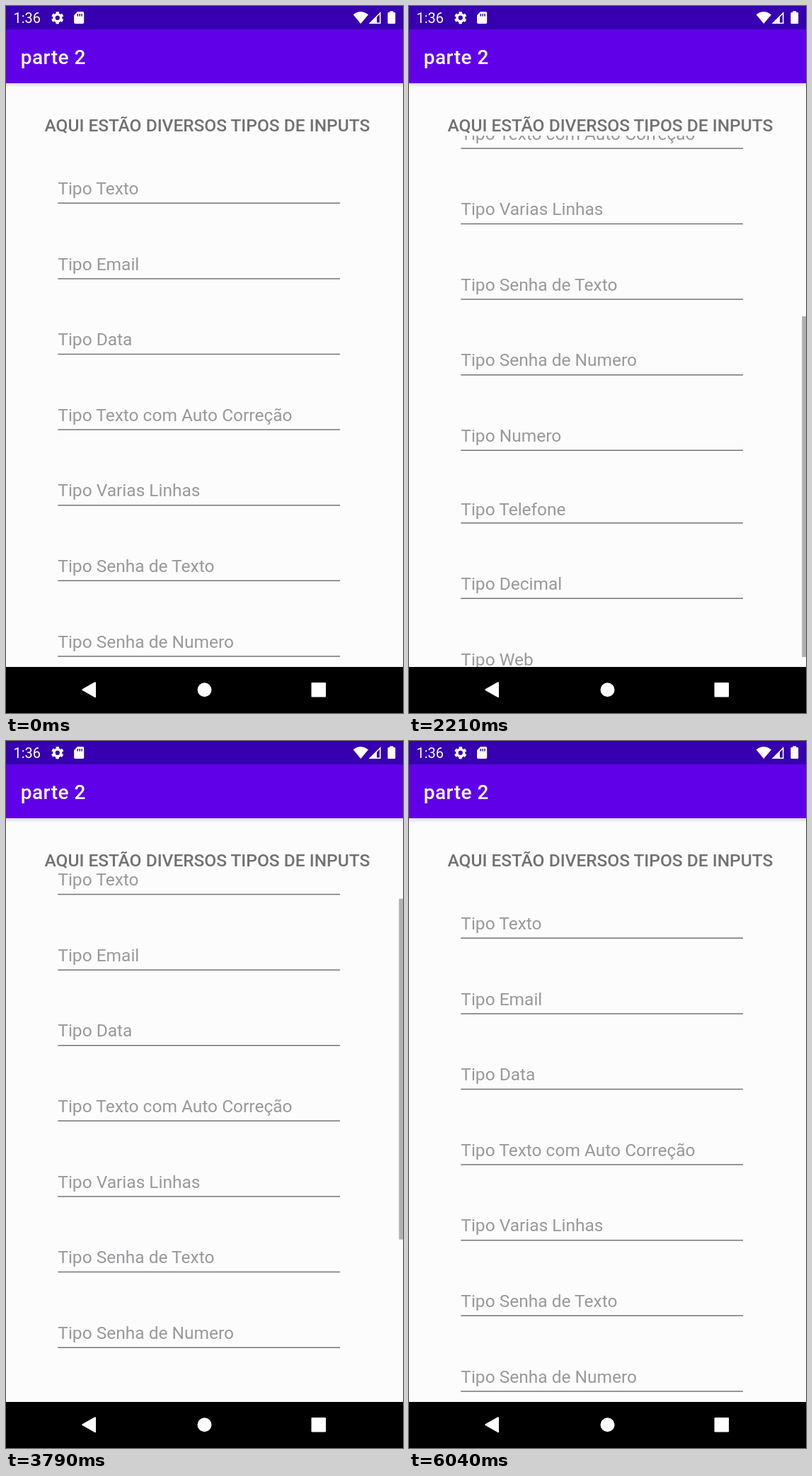
Write an HTML page that moves like this. It is 561 by 998 pixels and loops after 6.08 s.

```html
<!DOCTYPE html>
<html lang="pt">
<head>
<meta charset="utf-8">
<title>parte 2</title>
<style>
  html, body { margin: 0; width: 100%; height: 100%; overflow: hidden; background: #fcfcfd; }
  svg { display: block; width: 100%; height: 100%; font-family: Roboto, sans-serif; }
  .hint { font-size: 24.5px; fill: #99999b; }
  .rule { stroke: #747476; stroke-width: 1.5; }
  .medium { font-weight: 500; }
</style>
</head>
<body>
<svg viewBox="0 0 561 998" preserveAspectRatio="none">
  <defs>
    <linearGradient id="shadow" x2="0" y2="1">
      <stop offset="0" stop-color="#000" stop-opacity=".13"/>
      <stop offset="1" stop-color="#000" stop-opacity="0"/>
    </linearGradient>
    <clipPath id="viewport"><path d="M0 183H561V933H0Z"/></clipPath>
  </defs>
  <rect width="561" height="998" fill="#fcfcfd"/>

  <g clip-path="url(#viewport)">
    <g id="fields"></g>
    <path id="glow" fill="#6200ee" fill-opacity=".08"/>
    <rect id="bar" x="555.3" width="5.7" height="481" fill="#000" fill-opacity=".3"/>
  </g>
  <text class="medium" x="54.5" y="176.5" font-size="24.5" fill="#717171">AQUI ESTÃO DIVERSOS TIPOS DE INPUTS</text>

  <rect y="109" width="561" height="6" fill="url(#shadow)"/>
  <rect width="561" height="109" fill="#6000e9"/>
  <rect width="561" height="33" fill="#3600b1"/>
  <text class="medium" x="20.7" y="81.5" font-size="28" letter-spacing=".5" fill="#fff">parte 2</text>

  <g fill="#fff">
    <text x="10.5" y="24" font-size="20">1:36</text>
    <g fill="none" stroke="#fff" transform="translate(72.8 16.7)">
      <circle r="4.9" stroke-width="3.6"/>
      <circle r="7.3" stroke-width="2.8" stroke-dasharray="4.2 3.445" transform="rotate(-106.5)"/>
    </g>
    <path d="M101 8h7.500q1.700 0 1.700 1.700v13.600q0 1.700-1.700 1.700h-10.700q-1.700 0-1.700-1.700v-10.300z"/>
    <path d="M101.300 11v3.500M104.200 11v3.500M107.100 11v3.500" stroke="#3600b1" stroke-width="1.500"/>
    <path d="M490.700 12.200Q501.300 3.800 512 12.200L501.300 25Z"/>
    <path d="M514.500 24.200L528.700 10V24.200Z" fill="none" stroke="#fff" stroke-width="1.600"/>
    <path d="M513 25L524 14V25Z"/>
    <path d="M542.300 9V7.300h5V9h1.700q1.200 0 1.200 1.200v13.600q0 1.200-1.200 1.200h-8.400q-1.200 0-1.200-1.200V10.200q0-1.200 1.200-1.200z"/>
  </g>

  <rect y="933" width="561" height="65" fill="#000"/>
  <g fill="#fff" stroke="#fff" stroke-width="2" stroke-linejoin="round">
    <path d="M108.300 965.200L126 955.200V975.200Z"/>
    <circle cx="280.500" cy="965.200" r="9"/>
    <path d="M432.500 956h18.500v18.500h-18.500z"/>
  </g>
</svg>
<script>
const LOOP = 6080, TOP = 183, BAR_RATIO = 0.642;
const $ = id => document.getElementById(id);

// [hint, baseline, underline]
const evenRows = ['Texto', 'Email', 'Data', 'Texto com Auto Correção', 'Varias Linhas',
  'Senha de Texto', 'Senha de Numero', 'Numero']
  .map((name, i) => [name, 266 + i * 106.6, 278.3 + i * 106.6]);
const rows = [...evenRows, ['Telefone', 1116.5, 1127], ['Decimal', 1221.3, 1233.5], ['Web', 1328, 1340]];
$('fields').innerHTML = rows.map(([name, baseline, rule]) =>
  `<text class="hint" x="73.3" y="${baseline}">Tipo ${name}</text>
   <path class="rule" d="M73.300 ${rule}H472"/>`).join('');

const scrollKeys = [[1530, 0], [1590, 27], [1750, 145], [2000, 315], [2210, 397], [2320, 419],
  [3170, 419], [3290, 365], [3460, 249], [3700, 95], [3960, 0]];
const barKeys = [[1520, 0], [1540, 1], [2650, 1], [2900, 0], [3160, 0], [3180, 1], [4450, 1], [4700, 0]];
const glowKeys = [[3960, 0], [4250, 1], [4450, 1], [4950, 0]];

function sample(keys, t) {
  const next = keys.findIndex(([time]) => time > t);
  if (next === 0) return keys[0][1];
  if (next < 0) return keys[keys.length - 1][1];
  const [t0, v0] = keys[next - 1], [t1, v1] = keys[next];
  return v0 + (v1 - v0) * (t - t0) / (t1 - t0);
}

function render(t) {
  const scroll = sample(scrollKeys, t), glow = sample(glowKeys, t);
  $('fields').setAttribute('transform', `translate(0 ${-scroll})`);
  $('bar').setAttribute('y', TOP + scroll * BAR_RATIO);
  $('bar').setAttribute('opacity', sample(barKeys, t));
  $('glow').setAttribute('d', glow ? `M23 ${TOP}A1033 ${1033 * glow} 0 0 0 717 ${TOP}Z` : '');
  $('glow').setAttribute('opacity', Math.min(1, glow * 1.2));
}

const start = performance.now();
function tick() {
  render((performance.now() - start) % LOOP);
  requestAnimationFrame(tick);
}
tick();
</script>
</body>
</html>
```
